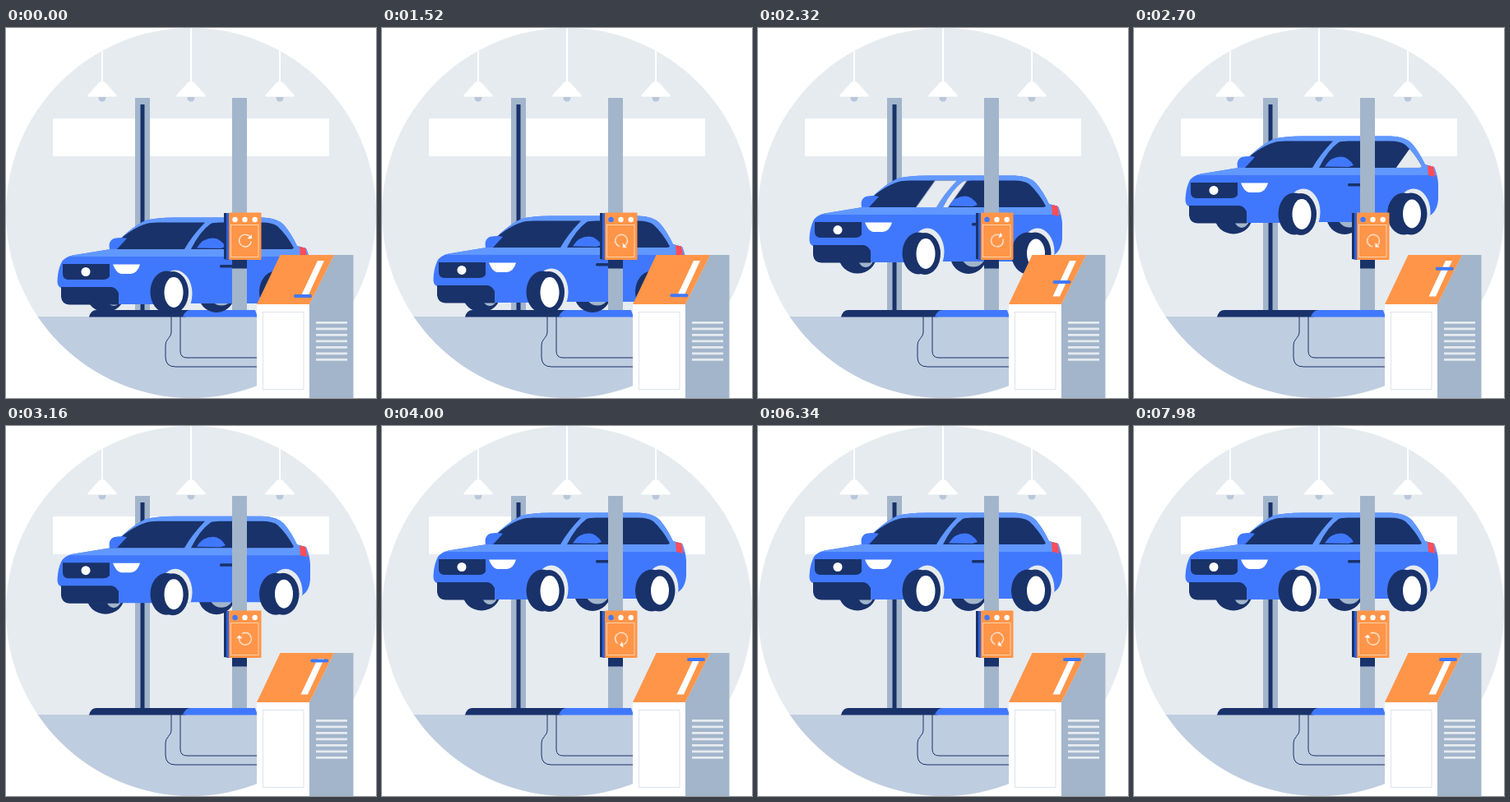
Recreate the animation shown at these times as an HTML page. Size 450x450 px, loop 8 s.

```html
<!DOCTYPE html>
<html lang="en">
<head>
<meta charset="utf-8">
<title>Car lift</title>
<style>
  @property --lift { syntax: '<number>'; inherits: true; initial-value: 125; }
  html, body { margin: 0; width: 100%; height: 100%; overflow: hidden; background: #fff; }
  svg { display: block; width: 100vw; height: 100vh; animation: lift 8s infinite; }

  .blue { fill: #4078fd; }
  .sky { fill: #6198ff; }
  .navy { fill: #19326a; }
  .steel { fill: #a2b5cb; }
  .mist { fill: #e6ebf0; }
  .orange { fill: #ff9548; }
  .white { fill: #fff; }
  .line { fill: none; stroke: #19326a; stroke-width: 1; }

  /* The body rises off its springs before the wheels leave the floor. */
  .body { transform: translateY(calc(var(--lift) * 1px)); }
  .wheels { transform: translateY(calc(min(var(--lift), 121) * 1px)); }
  .handle { transform: translate(calc(var(--lift) * -.168px), calc(var(--lift) * .336px)); }
  .glare { animation: glare 8s linear infinite; }
  .lamp { animation: lamp 8s linear infinite; }
  .icon { transform-origin: 291px 258.7px; animation: spin 8s linear infinite; }

  @keyframes lift {
    0% { --lift: 125; }
    15% { --lift: 125; animation-timing-function: cubic-bezier(.65, 0, .35, 1); }
    45%, 100% { --lift: 0; }
  }
  @keyframes glare {
    0%, 23.75% { transform: translateX(-140px); }
    35%, 100% { transform: translateX(160px); }
  }
  @keyframes lamp {
    0%, 5% { fill: #fff; }
    10%, 90% { fill: #4078fd; }
    95%, 100% { fill: #fff; }
  }
  @keyframes spin { to { transform: rotate(2400deg); } }
</style>
</head>
<body>
<svg viewBox="0 0 450 450">
  <defs>
    <clipPath id="room"><circle cx="225" cy="225" r="225"/></clipPath>
    <path id="shell" d="M67 191 Q62 189 62.500 182 Q63 170 67 161 Q70 154 81 151.500 L127 144 Q150 118 170 109 Q182 105.500 205 105.500 H312 Q330 106 338 114.500 Q347 125 354 140 L365 143 Q369 152 370 163 V182 Q369 198 358 203 L310 210 H222 L182 211 H76 Z"/>
    <path id="windscreen" d="M126 144 Q150 119 171 113 Q176 111.500 184 111.500 H242 Q226 128 217 144 Z"/>
    <path id="sideglass" d="M225 144 Q236 122 249 113 Q252 111.500 260 111.500 H312 Q324 111.500 330 116 Q341 126 350 142.500 Q349 144 346 144 Z"/>
    <clipPath id="shell-clip"><use href="#shell"/></clipPath>
    <clipPath id="glass"><use href="#windscreen"/><use href="#sideglass"/></clipPath>
    <g id="pendant">
      <path class="white" d="M-1 0 H1 V65 L3.500 66 L17.500 81.500 V83.500 H-17.500 V81.500 L-3.500 66 L-1 65 Z"/>
      <path d="M-4.500 84 H4.500 V85 A4.500 4.500 0 0 1 -4.500 85 Z" fill="#b9c7da"/>
    </g>
  </defs>

  <g clip-path="url(#room)">
    <rect class="mist" width="450" height="450"/>
    <rect class="white" x="57" y="110" width="336" height="46"/>
    <use href="#pendant" x="117"/>
    <use href="#pendant" x="225"/>
    <use href="#pendant" x="333"/>
    <rect y="351" width="450" height="99" fill="#bfcde0"/>
  </g>

  <rect class="steel" x="157" y="85" width="18" height="260"/>
  <rect class="navy" x="163.500" y="93" width="5" height="252"/>
  <path class="navy" d="M110 343 H225 L218 351.500 H101 Q103 343 110 343 Z"/>
  <path class="blue" d="M224 343 H303 L306 351.500 H215 Q218 343 224 343 Z"/>
  <path class="line" d="M201 351 V370 Q201 374 197.500 377.500 Q194 381 194 386 V400 Q194 412 206 412 H306 M212 351 V393 Q212 401 220 401 H306"/>

  <g class="wheels">
    <ellipse class="navy" cx="121" cy="203" rx="23" ry="21.500"/>
    <ellipse class="steel" cx="131" cy="203" rx="10" ry="14"/>
    <ellipse class="navy" cx="256" cy="203" rx="22" ry="22"/>
    <ellipse class="steel" cx="262" cy="201" rx="15" ry="15.500"/>
  </g>

  <g class="body">
    <use class="blue" href="#shell"/>
    <g clip-path="url(#shell-clip)">
      <rect class="sky" x="60" y="100" width="312" height="53"/>
      <ellipse class="mist" cx="206" cy="198" rx="20.500" ry="28.500"/>
      <ellipse class="mist" cx="340" cy="198" rx="20.500" ry="28.500"/>
    </g>
    <path class="navy" d="M67 190 H128 Q133 190 137 197 V211.500 H77 Q68 211 67 202 Z"/>
    <path fill="#ff4d57" d="M357 141 L364 142.500 Q366 148 366 155 L358 153 Z"/>
    <path class="navy" d="M69 162 H126 V177 Q124 181 118 181 H75 Q69 180 69 174 Z"/>
    <circle class="white" cx="97" cy="171.500" r="5.500"/>
    <path class="white" d="M130 162.500 H163 Q160 173 152 174 H140 Q134 173 130 162.500 Z"/>
    <use class="navy" href="#windscreen"/>
    <use class="navy" href="#sideglass"/>
    <g clip-path="url(#glass)">
      <path class="glare mist" d="M216 110 H255 L228 148 H189 Z"/>
    </g>
    <path class="blue" d="M126 144 Q124 134 131 131 Q140 129 147 131 L135 144 Z M232 142.500 Q239 130.500 252 130.500 Q261 131 267 141 L261 143 Z"/>
    <rect class="navy" x="260" y="163" width="16" height="3.500" rx="1.500"/>
  </g>

  <g class="wheels">
    <ellipse class="navy" cx="195" cy="200" rx="19.500" ry="25.500"/>
    <ellipse class="navy" cx="203" cy="200.500" rx="19" ry="25.500"/>
    <ellipse class="white" cx="204" cy="200.500" rx="11.500" ry="18.500"/>
    <ellipse class="navy" cx="328" cy="200" rx="20" ry="25.500"/>
    <ellipse class="navy" cx="337" cy="200" rx="19.500" ry="25.500"/>
    <ellipse class="white" cx="338" cy="200" rx="11" ry="17.500"/>
  </g>

  <rect class="steel" x="275" y="85" width="18" height="258"/>
  <rect class="navy" x="275" y="280" width="18" height="12.500"/>
  <path class="navy" d="M265 225 H272 V282 L265 281 Z"/>
  <rect x="268" y="225" width="3.500" height="56.500" fill="#2f62d9"/>
  <rect class="orange" x="271" y="224.500" width="39.500" height="57.500" rx="1"/>
  <circle class="lamp" cx="278.500" cy="233" r="3.200"/>
  <circle class="white" cx="290.500" cy="233" r="3.200"/>
  <circle class="white" cx="302.700" cy="233" r="3.200"/>
  <rect x="273.500" y="239.500" width="33.500" height="39" fill="none" stroke="#ffe0c7" stroke-width=".8"/>
  <g class="icon">
    <path d="M298.300 259.700 A7.400 7.400 0 1 1 296 253.200" fill="none" stroke="#fff" stroke-width="1.100"/>
    <path class="white" d="M298.800 251 V256.300 H293.500 Z"/>
  </g>

  <path class="steel" d="M399 276 H422.500 V450 H369 V336 Z"/>
  <rect class="white" x="305" y="335.500" width="64" height="114.500"/>
  <rect x="312.500" y="345.500" width="49.500" height="94" fill="none" stroke="#d5dde7" stroke-width=".8"/>
  <path class="orange" d="M333.500 276 H399 L369 336 H305 Z"/>
  <path class="white" d="M379 283 H387 L367 326.500 H358.500 Z"/>
  <path d="M396 357 V405" stroke="#e6ebf0" stroke-width="38" stroke-dasharray="2.700 4.800"/>
  <rect class="handle blue" x="371" y="282" width="22" height="4" rx="2"/>
</svg>
</body>
</html>
```
